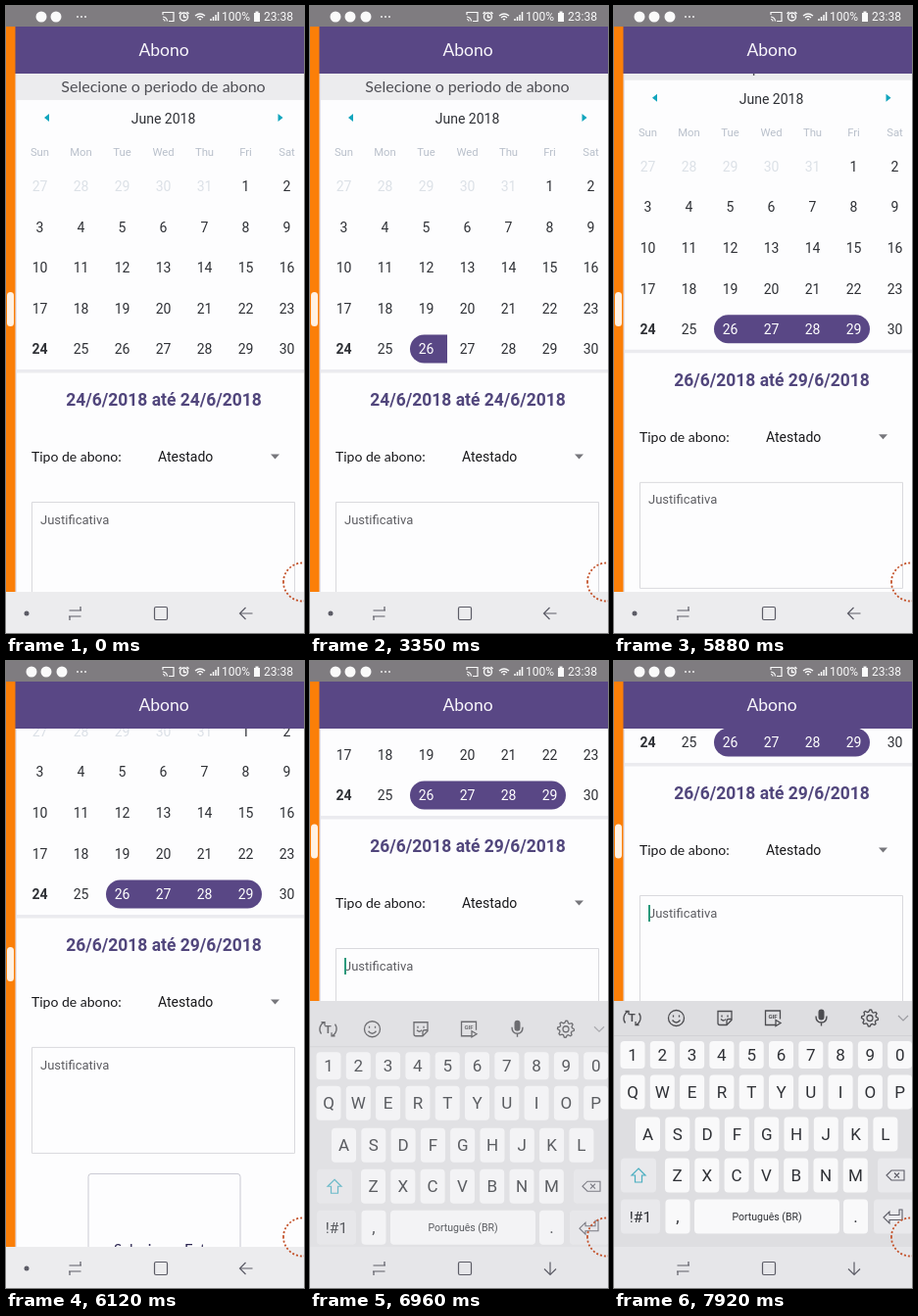
An HTML page with a canvas for the animation above (8 s loop, 304x640 px).

```html
<!DOCTYPE html>
<html lang="pt-BR">
<head>
<meta charset="utf-8">
<title>Abono</title>
<style>
html, body { margin: 0; width: 304px; height: 640px; overflow: hidden; background: #fdfdfe }
canvas { display: block; width: 304px; height: 640px }
</style>
</head>
<body>
<canvas></canvas>
<script>
const LOOP = 8000;
const canvas = document.querySelector('canvas');
const c = canvas.getContext('2d');
const ratio = window.devicePixelRatio || 1;
canvas.width = 304 * ratio;
canvas.height = 640 * ratio;

const PURPLE = '#594785', PAPER = '#fdfdfe', PALE = '#ececee', INK = '#2f3136', GREY = '#5c5c66';
const TOP = 69, NAV = 598, KEYS_TOP = 347;
const PICK_START = 240, PICK_END = 4280, FOCUS = 6800, RESIZE = 6870;

// Progress from a to b with a decelerating curve of power p
const ease = (t, a, b, p = 2) => 1 - (1 - Math.min(1, Math.max(0, (t - a) / (b - a)))) ** p;
const mix = (a, b, k) => a + (b - a) * k;

// Finger scroll: soft start, long slow-down
function fling(t, a, b) {
  const k = ease(t, a, b, 1.62);
  return k * k * (3 - 2 * k);
}

function rect(x, y, w, h, fill, r = 0) {
  c.fillStyle = fill;
  c.beginPath();
  c.roundRect(x, y, w, h, r);
  c.fill();
}

function circle(x, y, r, fill) {
  c.fillStyle = fill;
  c.beginPath();
  c.arc(x, y, r, 0, 7);
  c.fill();
}

// SVG path drawn around (x, y); width 0 fills it
function icon(d, x, y, color, width = 1) {
  c.save();
  c.translate(x, y);
  c.lineWidth = width;
  c.strokeStyle = c.fillStyle = color;
  const p = new Path2D(d);
  width ? c.stroke(p) : c.fill(p);
  c.restore();
}

// y is the middle of the capitals
function text(s, x, y, size, color, { align = 'center', weight = 400, font = 'Roboto' } = {}) {
  c.font = `${weight} ${size}px ${font}, sans-serif`;
  c.textAlign = align;
  c.fillStyle = color;
  c.fillText(s, x, y + size * .355);
}

function scrollAt(t) {
  return 18 * fling(t, 3350, 3850) + 195 * fling(t, 5850, 6650) + 54 * fling(t, 7500, 7920);
}

function calendar(t) {
  rect(9, 69, 295, 27, PALE);
  text('Selecione o periodo de abono', 160.5, 82, 16, '#4f4f55', { font: 'Lato' });
  icon('M2.5-4V4L-2.5 0Z', 41.5, 114, '#12a5bd', 0);
  icon('M-2.5-4V4L2.5 0Z', 280, 114, '#12a5bd', 0);
  text('June 2018', 160.5, 115, 14, INK);

  const colX = i => 34.5 + 42 * i;
  'Sun Mon Tue Wed Thu Fri Sat'.split(' ').forEach((d, i) => text(d, colX(i), 149, 11.3, '#b9c0cb'));

  const ranged = t >= PICK_END, picked = t >= PICK_START;
  if (ranged) rect(102, 335.5, 159, 29, PURPLE, 14.5);
  else if (picked) rect(102, 335.5, 38, 29, PURPLE, [14.5, 0, 0, 14.5]);

  for (let i = 0; i < 35; i++) {
    const day = i < 5 ? 27 + i : i - 4;
    const on = i >= 5 && (ranged ? day >= 26 && day <= 29 : picked && day === 26);
    text(day, colX(i % 7), 184 + 41.6 * Math.floor(i / 7), 14,
      on ? '#fff' : i < 5 ? '#dce1e7' : INK, { weight: i === 28 ? 700 : 400 });
  }
}

function form(t) {
  const range = t >= PICK_END ? '26/6/2018 até 29/6/2018' : '24/6/2018 até 24/6/2018';
  rect(9, 371, 295, 3.5, '#ebebef');
  text(range, 161, 402, 17.45, '#51467c', { weight: 700 });
  text('Tipo de abono:', 26, 460, 14, '#18181b', { align: 'left', font: 'Lato' });
  text('Atestado', 155, 460, 14, '#18181b', { align: 'left' });
  icon('M-4.5-2.5H4.5L0 2.5Z', 274.5, 460, '#77777c', 0);
  icon('M0 0H268V108H0Z', 26.5, 506.5, '#d9d9dd');
  text('Justificativa', 35, 524, 13, '#5d5d62', { align: 'left' });
  if (t >= FOCUS) rect(35, 516, 2, 17, '#2b9a7c');
  icon('M3 0H152Q155 0 155 3V99Q155 102 152 102H3Q0 102 0 99V3Q0 0 3 0', 84, 635.5, '#c9c9d2');
  text('Selecionar Foto', 161, 713, 15, '#2c2652', { font: 'Lato' });
}

function statusBar(t) {
  rect(0, 0, 304, 21, '#7f7c80');
  const white = '#fafafa', k = ease(t, 40, 400);
  c.globalAlpha = k;
  circle(26, 11, 5.5, white);
  c.globalAlpha = 1;
  circle(mix(36, 41, k), 11, 5.5, white);
  circle(mix(51, 57, k), 11, 5.5, white);
  for (const x of [73, 77, 81]) circle(x, 11, .9, white);

  icon('M-5-2V-4.5H6V4.5H1M-5 0A5 5 0 0 1-.5 4.5M-5 2.5A2 2 0 0 1-3 4.5', 165, 11, white, 1.2);
  icon('M4 0A4 4 0 1 1-4 0A4 4 0 1 1 4 0M0-2.5V.5H2.5M-5-3L-3-5M5-3L3-5', 181.5, 11, white, 1.4);
  icon('M-5-2Q0-6 5-2M-3 0Q0-3 3 0M-1 2Q0 1 1 2', 198, 12, white, 1.3);
  icon('M-4 4V2M-1.5 4V0M1-2V4M3.5-5V4', 213, 11, white, 1.5);
  text('100%', 234.5, 11, 12, white);
  icon('M-3-4H-1.5V-5.5H1.5V-4H3V5H-3Z', 256, 11, white, 0);
  text('23:38', 278, 11, 12, white);
}

function toolbar(y) {
  const ink = '#4c4c50';
  icon('M-7 5A8 8 0 0 1-4-7M7-5A8 8 0 0 1 4 7M-7-7H-3.5V-3.5M7 7H3.5V3.5', 18.5, y, ink, 1.3);
  text('T', 18.5, y, 11, ink, { weight: 700 });
  icon('M8 0A8 8 0 1 1-8 0A8 8 0 1 1 8 0M-4 2Q0 7 4 2M-3-3V-1M3-3V-1', 63.5, y, ink, 1.3);
  icon('M-7-7H7V2L2 7H-5Q-7 7-7 5ZM7 1H4Q2 1 2 3V7M-4 1Q-1 4 1 1M-3-3V-1M3-3V-1', 113, y, ink, 1.3);
  icon('M3 7H-7.5V-7.5H7.5V1M3 2L8 5L3 8Z', 162, y, ink, 1.3);
  text('GIF', 162, y - 2, 6, ink, { weight: 700 });
  rect(208.5, y - 9, 6, 11, ink, 3);
  icon('M-5.5-2Q-5.5 4.5 0 4.5T5.5-2M0 4.5V8', 211.5, y, ink, 1.4);

  let gear = 'M3 0A3 3 0 1 1-3 0A3 3 0 1 1 3 0';
  for (let i = 0; i <= 32; i++) {
    const a = i * Math.PI / 16, r = i % 4 < 2 ? 8.5 : 6.5;
    gear += `${i ? 'L' : 'M'}${r * Math.cos(a)} ${r * Math.sin(a)}`;
  }
  icon(gear, 261, y, ink, 1.3);
  icon('M-5-2.5L0 2.5L5-2.5', 295, y, '#9b9ba0', 1.2);
}

function key(label, x, y, w = 25, h = 35, fill = '#f9f9fa', size = 17) {
  rect(x - w / 2, y - h / 2, w, h, fill, 4);
  text(label, x, y, size, INK);
}

// The keyboard rises a little while it fades in
function keyboard(t) {
  const shown = ease(t, RESIZE, RESIZE + 173);
  c.save();
  c.beginPath();
  c.rect(0, KEYS_TOP, 304, NAV - KEYS_TOP);
  c.clip();
  rect(0, KEYS_TOP, 304, 251, '#f0f0f2');
  c.globalAlpha = shown;
  rect(0, KEYS_TOP, 304, 251, '#dedee1');
  c.translate(0, 50 * (1 - shown));
  rect(0, 382, 304, 1, '#d2d2d6');
  toolbar(364.5);

  const row = (keys, x, y, h) => [...keys].forEach((k, i) => key(k, x + 30.3 * i, y, 25, h));
  row('1234567890', 19, 402, 28);
  row('QWERTYUIOP', 19, 440);
  row('ASDFGHJKL', 34.5, 483);
  row('ZXCVBNM', 64.5, 525);

  const soft = '#e9e9ec';
  key('', 25, 525, 36, 35, soft);
  icon('M0-7L7 0H3.5V7H-3.5V0H-7Z', 25, 525, '#4aaec0', 1.2);
  key('', 287, 525, 36, 35, soft);
  icon('M-9 0L-4-5H9V5H-4ZM-1-2.5L4 2.5M4-2.5L-1 2.5', 287, 525, GREY, 1.1);
  key('!#1', 27, 567, 40, 35, soft, 15.5);
  key(',', 65, 567);
  key('Português (BR)', 156, 567, 148, 35, '#f9f9fa', 10.5);
  key('.', 246.5, 567);
  key('', 285, 567, 40, 35, soft);
  icon('M-10 1L-4-5V-1.5H6V-7H9V3.5H-4V7Z', 285, 567, GREY, 1.1);
  c.restore();
}

function navBar(open) {
  rect(0, NAV, 304, 42, open ? '#e6e6e9' : PALE);
  if (!open) circle(21, 620, 2.5, GREY);
  icon('M-6.5 3H6M-5.5 3V7M6.5-3H-6M5.5-3V-7', 70.5, 620, GREY, 1.2);
  icon('M-5-6.5H5Q6.5-6.5 6.5-5V5Q6.5 6.5 5 6.5H-5Q-6.5 6.5-6.5 5V-5Q-6.5-6.5-5-6.5', 158, 620, GREY, 1.2);
  icon(open ? 'M0-6.5V6.5M-6 .5L0 6.5L6 .5' : 'M6.5 0H-6.5M-.5-6L-6.5 0L-.5 6', 245, 620, GREY, 1.2);
}

function draw(t) {
  c.setTransform(ratio, 0, 0, ratio, 0, 0);
  rect(0, 0, 304, 640, PAPER);
  const open = t >= RESIZE;
  const bottom = open ? KEYS_TOP : NAV;

  c.save();
  c.beginPath();
  c.rect(9, TOP, 295, bottom - TOP);
  c.clip();
  c.translate(0, -scrollAt(t));
  calendar(t);
  form(t);
  c.restore();

  rect(9, 21, 295, 48, PURPLE);
  text('Abono', 161, 45, 17.5, '#f8f6fb', { font: 'Lato' });
  rect(9, TOP, 2, bottom - TOP, '#e4e2ea');
  rect(0, 21, 9.5, bottom - 21, '#fb7f08');
  rect(1, (21 + bottom) / 2 - 17.5, 7, 35, '#fff1e2', 3.5);
  statusBar(t);
  if (open) keyboard(t);
  navBar(open);

  c.setLineDash([2, 2]);
  icon('M-19.5 0A19.5 19.5 0 1 1 19.5 0A19.5 19.5 0 1 1-19.5 0', 302.5, 588, '#c4532c', 1.8);
  c.setLineDash([]);
}

const start = performance.now();
function tick() {
  draw((performance.now() - start) % LOOP);
  requestAnimationFrame(tick);
}
tick();
</script>
</body>
</html>
```
